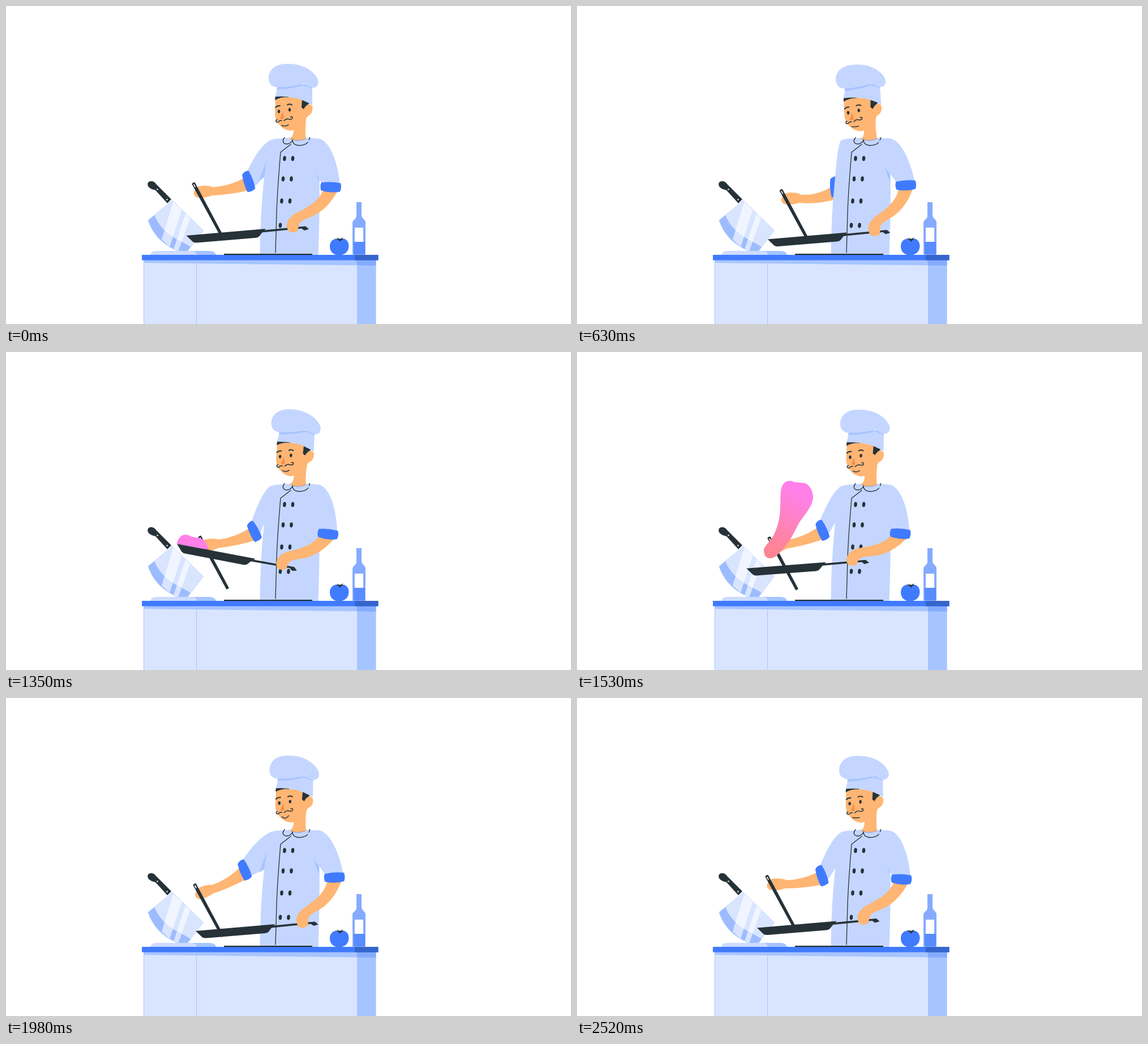
An HTML page for the animation above (2550 ms loop, 998 px wide and 561 px high).

```html
<!DOCTYPE html>
<html lang="en">
<head>
<meta charset="utf-8">
<title>Chef at the stove</title>
<style>
  html, body { margin: 0; width: 100%; height: 100%; overflow: hidden; background: #fff; }
  svg { display: block; width: 100%; height: 100%; }
  .ink { fill: #263238; }
  .line { fill: none; stroke: #263238; stroke-linecap: round; stroke-linejoin: round; }
  .cloth { fill: #c4d6ff; }
  .shade { fill: #a6c4ff; }
  .pale { fill: #d9e5ff; }
  .blue { fill: #407bff; }
  .skin { fill: #ffb573; }
</style>
</head>
<body>
<svg viewBox="0 0 998 561">
  <defs>
    <linearGradient id="pink" gradientUnits="userSpaceOnUse" x1="392" y1="250" x2="345" y2="345">
      <stop offset="0" stop-color="#ff80e8"/>
      <stop offset="1" stop-color="#ff8496"/>
    </linearGradient>
    <clipPath id="aboveRim"><path id="rim" d="M-100,441 L318,405 L459,393 L900,355 V-300 H-100Z"/></clipPath>
    <clipPath id="blade"><path d="M294,343 L348.500,396 L321,432 H303 Q263,415 251,378Z"/></clipPath>
  </defs>

  <!-- cleaver -->
  <path class="shade" d="M320,439 V432 H358 Q370,432 371,439Z"/>
  <path class="pale" d="M255,439 Q256,432 267,432 H327 Q337,432 337,439Z" style="fill:#cbdcff"/>
  <g clip-path="url(#blade)">
    <path class="pale" d="M240,335 H360 V440 H240Z"/>
    <path style="fill:#9dbcff" d="M240,378 L262,368.500 Q274,399 309,415 L325,424 V440 H240Z"/>
    <path fill="#fff" fill-opacity=".62" d="M296,344 L311,358 L289,425 L275,412Z M318,364 L326,372 L303,436 L295,432Z"/>
  </g>
  <path d="M294,343 L348.500,396 L321,432 H303 Q263,415 251,378Z" fill="none" stroke="#b4ccff" stroke-width=".7"/>
  <path class="ink" d="M251,318 Q248,310 256,309 Q262,309 265,314 L292,341 L285,348 L264,325 Q254,323 251,318Z"/>
  <g fill="#fff"><circle cx="267.500" cy="323.500" r="1.200"/><circle cx="284.500" cy="341.500" r="1.200"/></g>

  <!-- far arm -->
  <g id="farArm">
    <path id="farFore" class="skin"/>
    <path id="farFist" class="skin" d="M22,-5 Q8,-11 -1,-10 Q-11,-6 -12,1 Q-11,8 -5,9 Q8,13 20,10Z"/>
    <path id="farSleeve" class="cloth"/>
    <path id="farShade" class="shade" d="M464,262 L447,308 L458,301Z"/>
    <path id="farCuff" class="blue" d="M-7,-14 Q0,-20 6,-17 Q10,0 8,16 Q1,20 -7,18 Q-10,2 -7,-14Z"/>
  </g>

  <!-- torso -->
  <path class="cloth" d="M467,240 Q471,234 483,234 Q516,230 552,234 Q556,330 551.500,439 H448.500 Q449,370 455,312 Q459,272 467,240Z"/>
  <path class="shade" d="M543,283 L553,297 V312Z"/>
  <path class="line" stroke-width="1.300" d="M503,244 L485,258 Q479,330 478,365 L476,435"/>
  <g id="buttons" class="ink"></g>

  <!-- head -->
  <g id="head">
    <path class="skin" d="M530,236 Q527,212 532,186 L505,212 L508,220 Q508,229 501,235 Q515,240 530,236Z"/>
    <path class="skin" d="M476,158 L475,191 C476,206 488,218 500,219.500 Q506,220.500 510,217 L529,203 Q530,195 535,193 Q542,189 541.500,179 Q540,172 531,174 L538,165Z"/>
    <path class="ink" d="M475,166 L476,158 H499 V161 Q486,160 475,166Z M523,165 L538,171 Q529,175 526,182 L522,179Z"/>
    <path class="cloth" d="M481,136 L475.500,160 Q513,157 541,175 V138Z"/>
    <path class="shade" d="M479,140 L478,147 Q506,146 525,140 Q533,143 541,146 V138Z"/>
    <path class="cloth" d="M478,143 C464,142 461,128 466,117 C473,103 489,101.500 500,102 C524,102 543,114 550,128 C554,138 549,145 541,144 Q534,143 527,136.500 Q508,143 478,143Z"/>
    <path d="M489,186 L484,199 H491Z" fill="#f58c45"/>
    <g class="ink">
      <ellipse cx="482" cy="186" rx="2.200" ry="3.100"/>
      <ellipse cx="501" cy="183" rx="2.200" ry="3.100"/>
    </g>
    <path class="line" stroke-width="1.900" d="M476,179 Q479,175.500 484,176 M497,174.500 Q501,172 505,174.500"/>
    <path class="line" stroke-width="1.500" d="M479,200.500 Q475,202 478,205 Q481,206 483,202.500 L487,202 M491,202.500 Q495,198 499,199.500 Q506,201 506,197 Q505,194 502.500,196"/>
    <path id="mouth" class="line" stroke-width="1.400"/>
  </g>
  <path class="cloth" d="M492,233 Q503,239 515,237 Q526,238 536,232 Q536,243 522,245 Q509,247 506,238 Q501,244 494,243 Q488,240 492,233Z"/>
  <path class="line" stroke-width="1.400" d="M492,232 Q487,238 491,242 Q496,245 501,242 Q506,239 506,236 Q506,245 517,246 Q535,246 536.500,232"/>
  <path fill="none" stroke="#6c8fd8" stroke-width=".8" d="M504,234 Q515,241 529,234"/>

  <!-- counter -->
  <path class="pale" d="M243,448 H653.500 V561 H243Z"/>
  <path class="shade" d="M620,448 H653.500 V561 H620Z M243,448 H620 V457.500 L243,453Z"/>
  <path fill="#85acff" d="M620,448 H653.500 V458 L620,457.500Z"/>
  <path fill="none" stroke="#a6c4ff" d="M336.500,449 V561 M243.500,449 V561"/>
  <path class="blue" d="M240,439 H657.500 V448.500 H240Z"/>
  <path fill="#3565cc" d="M616,439 H657.500 V448.500 H616Z"/>
  <path class="ink" d="M385,437 H541 V439.300 H385Z"/>

  <!-- bottle and tomato -->
  <path fill="#85abff" d="M619,346 H628 V370 Q629,374 633,377 Q635,379 635,383 V438.500 H612 V383 Q612,379 615,377 Q619,374 619,370Z"/>
  <path fill="#588cff" d="M614,416 H634 V438.500 H614Z"/>
  <path fill="#fff" d="M616,391 H631 V416 H616Z"/>
  <path class="blue" d="M589,412 C599,407 606,415 605.500,424 C605,434 598,439.500 588,439.500 C579,439.500 572,434 572,424 C572,414 580,408 589,412Z"/>
  <path class="ink" d="M581,410 L587,411 L584,408.500 L590,411 L596,408 L593,411.500 L598,412 L592,413 L590,416 L588,413Z"/>

  <!-- cooking -->
  <g id="spatula">
    <path class="ink" d="M328.300,314 Q330,311 333.500,311 L383,403.500 L378.500,406Z"/>
    <path fill="none" stroke="#fff" stroke-width="1.600" stroke-linecap="round" d="M331.800,315 L334,319"/>
  </g>
  <g clip-path="url(#aboveRim)">
    <path id="meat" fill="url(#pink)" d="M330,352 C329,341 346,333 352,312 C362,288 358,262 360,245 C362,231 370,226 379,227.500 C387,232 396,229 404,232 C412,236 417,246 417,257 C416,274 400,288 391,304 C381,323 374,338 361,351 C355,357 350,364 340,364 Q331,363 330,352Z"/>
  </g>
  <g id="pan" class="ink">
    <path d="M318.500,405 L459,393 Q453,398 448,405.500 Q446,408.500 441,409 L338,417.500 Q333,418 330,416Z"/>
    <path d="M450,396 L513,390 L529,388.500 L535,393.500 L527,396 L522,392.500 L452,399.500Z"/>
  </g>

  <!-- near arm -->
  <path id="nearFore" class="skin" d="M562,318 C557,340 540,352 513,365 C502,371 497,378 496,386 C496,394 499,399 505,399.500 L514,398 C517,394 516,388 518,384 C522,377 530,376 541,371 C561,362 575,346 587,324Z"/>
  <g id="nearSleeve">
    <path class="cloth" d="M533,238 Q540,233 553,234 C572,238 586,275 590,316 L558,314 C550,299 545,292 540,275Z"/>
    <path class="blue" d="M557,311.500 Q574,309 591,312.500 Q593.500,320 590,327.500 Q574,331 556.500,325.500 Q554,318 557,311.500Z"/>
  </g>
</svg>
<script>
const LOOP = 2550, STEP = 30;
const $ = id => document.getElementById(id);
const set = (id, name, value) => $(id).setAttribute(name, value);
const move = (id, value) => set(id, 'transform', value);
const deg = rad => rad * 180 / Math.PI;

// time, x, y, tilt of the grip
const PAN = [
  [0, 0, 0, 0], [200, 9, -1.5, 0], [390, 15.5, 1, 0], [560, 18, 6, 0],
  [900, 17, 7, 0], [1060, 9, 10, 0], [1140, 1, 9, 0], [1240, -12, 0, 6],
  [1350, -18, -15, 15.6], [1440, -21.5, -23, 9], [1530, -19, -22, .4],
  [1650, -12, -6, 0], [1980, 16.5, 6, 0], [2100, 12, 9.500, 0],
  [2220, 2, 9, 0], [2520, -.5, .5, 0]
];
// time, spatula x, y, cuff x, y, cuff tilt, elbow sag
const STIR = [
  [0, 0, 0, 428, 309, 17, 0], [110, -4, 0, 426, 308, 17, 0],
  [390, 34, 8, 462, 313, -25, 1], [640, 29, 12, 455, 319, 5, .4],
  [900, 17, 13, 443, 321, 21, 0], [1350, 11, 13, 438, 316, 25, 0],
  [1530, 8, 14.5, 433, 314, 22, 0], [1980, 2, 16, 421, 303, 22, 0],
  [2260, 15, 7, 436, 312, 20, 0], [2520, 4, 1, 432, 313, 18, 0]
];
// time, head tilt, smile
const HEAD = [
  [0, 0, .7], [390, -3.3, 0], [640, -3.6, .3], [900, -3.6, .9], [1100, -2, .8],
  [1350, 2.5, .7], [1530, .6, .7], [1980, .9, 1.2], [2520, -.4, .2]
];
// time, x, y, turn
const MEAT = [
  [1200, -64, 240, 6], [1260, -62, 185, 6], [1350, -58, 96, 6], [1440, -29, 30, 3],
  [1530, 0, 0, 0], [1620, 10, 14, -4], [1710, 12, 76, -6], [1830, 8, 210, -6]
];

// smooth curve through looping keys
function pose(keys, t) {
  const n = keys.length;
  const at = i => {
    const k = keys[(i + n) % n];
    return [k[0] + Math.floor(i / n) * LOOP, ...k.slice(1)];
  };
  let i = n - 1;
  while (i >= 0 && keys[i][0] > t) i--;
  const [a, b, c, d] = [i - 1, i, i + 1, i + 2].map(at);
  const span = c[0] - b[0], u = (t - b[0]) / span;
  return b.slice(1).map((p, j) => {
    j++;
    const m0 = (c[j] - a[j]) / (c[0] - a[0]) * span;
    const m1 = (d[j] - b[j]) / (d[0] - b[0]) * span;
    const e = c[j] - p;
    return p + u * (m0 + u * (3 * e - 2 * m0 - m1 + u * (m0 + m1 - 2 * e)));
  });
}

const S = [545, 245], E = [574, 320], H = [507, 385];
const dist = (p, q) => Math.hypot(q[0] - p[0], q[1] - p[1]);
const angle = (p, q) => Math.atan2(q[1] - p[1], q[0] - p[0]);
const UPPER = dist(S, E), FORE = dist(E, H);

function nearArm(hand) {
  const d = dist(S, hand);
  const bend = Math.acos(Math.min(1, (UPPER ** 2 + d * d - FORE ** 2) / (2 * UPPER * d)));
  const a = angle(S, hand) - bend;
  const elbow = [S[0] + UPPER * Math.cos(a), S[1] + UPPER * Math.sin(a)];
  const turn = deg(angle(elbow, hand) - angle(E, H));
  move('nearSleeve', `rotate(${deg(a - angle(S, E))} ${S})`);
  move('nearFore', `translate(${elbow}) rotate(${turn}) translate(${-E[0]} ${-E[1]})`);
}

function farArm([dx, dy, cx, cy, tilt, sag]) {
  move('spatula', `translate(${dx} ${dy})`);
  const hand = [343 + dx, 328 + dy], elbow = [cx, cy + 14 * sag];
  const len = dist(hand, elbow), mid = 8 * sag;
  const frame = `translate(${hand}) rotate(${deg(angle(hand, elbow))})`;
  set('farFore', 'd', `M15,-5 Q52,${3 + mid} ${len},-9 L${len + 4},16 Q52,${17 + mid} 15,10Z`);
  move('farFore', frame);
  move('farFist', frame);
  move('farCuff', `translate(${cx} ${cy}) rotate(${-tilt})`);
  const r = tilt * Math.PI / 180, co = Math.cos(r), si = Math.sin(r);
  const corner = (x, y) => [cx + x * co + y * si, cy - x * si + y * co];
  set('farSleeve', 'd', `M485,234 Q473,234 466,237 Q${446 + (cx - 428) * .5},249 ${corner(2, -16)} L${corner(4, 14)} Q453,307 462,290Z`);
  set('farShade', 'opacity', Math.max(0, Math.min(1, (432 - cx) / 4)));
}

function draw(t) {
  const [px, py, tilt] = pose(PAN, t);
  const hand = [H[0] + px, H[1] + py];
  const panMove = `translate(${px} ${py}) rotate(${tilt} ${H})`;
  move('pan', panMove);
  move('rim', panMove);
  nearArm(hand);
  farArm(pose(STIR, t));

  const [lean, smile] = pose(HEAD, t);
  move('head', `rotate(${lean} 518 235)`);
  set('mouth', 'd', `M487,${211 - smile} Q493,${211 + 4 * smile} 499,${211.5 - 3 * smile}`);

  const flying = t >= 1200 && t < 1830;
  set('meat', 'visibility', flying ? 'visible' : 'hidden');
  if (flying) {
    const [mx, my, turn] = pose(MEAT, t);
    move('meat', `translate(${mx} ${my}) rotate(${turn} 385 240)`);
  }
}

for (const [x, y] of [[492, 269], [489.5, 305], [487, 344], [484.5, 387]]) {
  for (const gap of [0, 14.5]) {
    const b = document.createElementNS('http://www.w3.org/2000/svg', 'ellipse');
    const spec = { cx: x + gap, cy: y, rx: 2.8, ry: 4.5, transform: `rotate(5 ${x + gap} ${y})` };
    for (const k in spec) b.setAttribute(k, spec[k]);
    $('buttons').append(b);
  }
}

const start = performance.now();
function tick() {
  const t = (performance.now() - start) % LOOP;
  draw(Math.floor(t / STEP) * STEP);
  requestAnimationFrame(tick);
}
tick();
</script>
</body>
</html>
```
